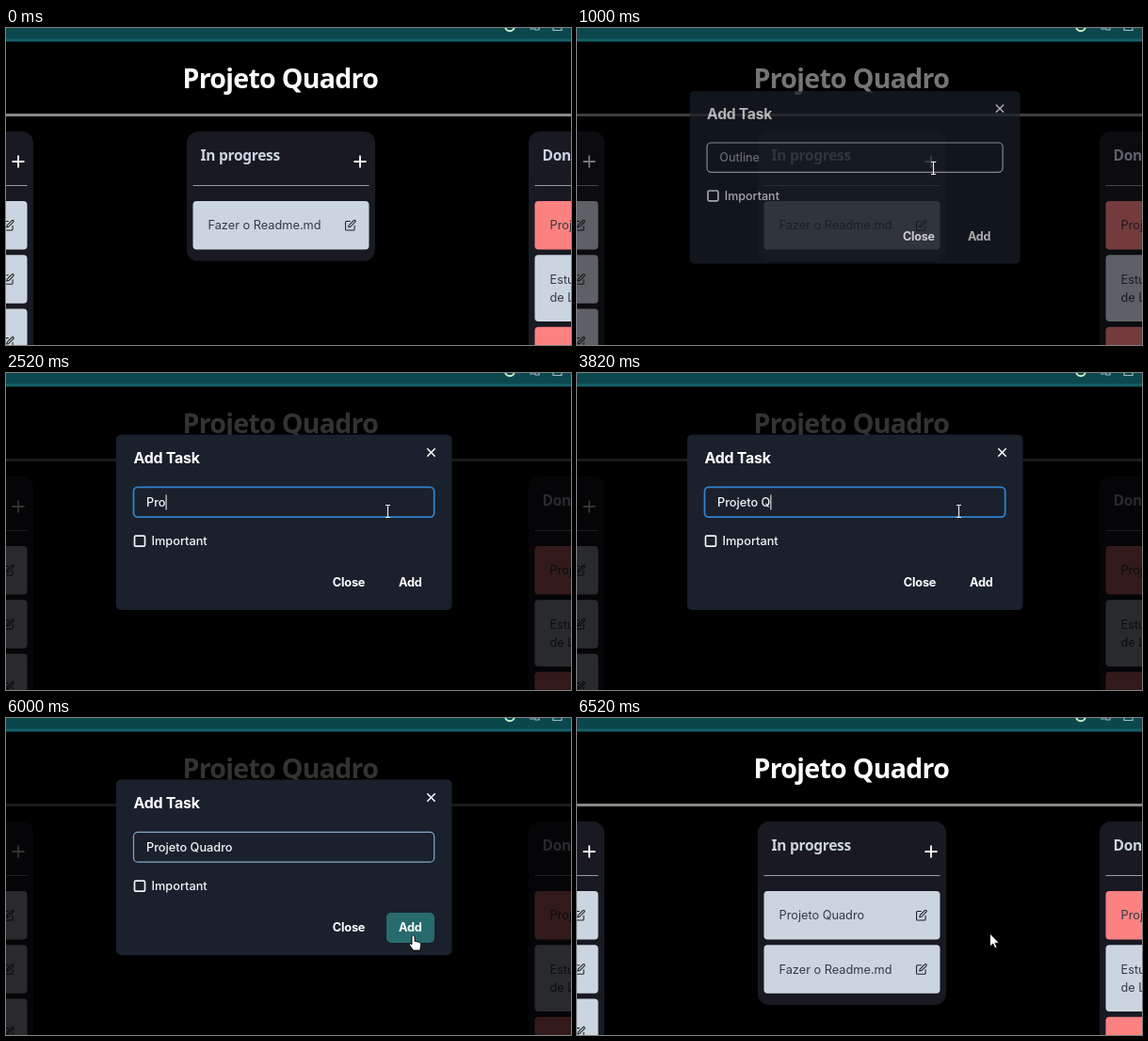
Animation, 600 px wide and 337 px high, one loop 6.56 s. Source, as an HTML page:

```html
<!DOCTYPE html>
<html lang="pt">
<head>
<meta charset="utf-8">
<title>Quadro de tarefas</title>
<style>
html, body { margin: 0; width: 100%; height: 100%; overflow: hidden; background: #000; }
svg { display: block; width: 600px; height: 337px; }
text { font: 500 12.75px Inter, "Open Sans", sans-serif; white-space: pre; }
.head { font: 700 15.5px "Noto Sans", "Open Sans", sans-serif; letter-spacing: -.018em; fill: #cbd5e0; }
.title { font-size: 28.5px; letter-spacing: -.025em; fill: #fff; }
.task { font-weight: 400; fill: #343a44; }
.strong { font-weight: 700; letter-spacing: -.015em; fill: #fff; }
.edit { fill: none; stroke: #1c2028; stroke-width: 2; stroke-linecap: round; stroke-linejoin: round; }
.cursor path { fill: #fff; stroke: #000; stroke-width: .9; stroke-linejoin: round; }
</style>
</head>
<body>
<svg viewBox="0 0 600 337">
  <rect width="600" height="337"/>
  <text class="head title" x="187.500" y="63.700">Projeto Quadro</text>
  <rect y="91" width="600" height="3" fill="#8a8884"/>
  <g id="side"></g>
  <g id="before"></g>
  <g id="after"></g>
  <rect id="shade" width="600" height="337"/>
  <g id="bar">
    <rect width="600" height="12" fill="#0c474e"/>
    <rect y="11.500" width="600" height="3" fill="#14606a"/>
    <circle cx="535" cy="-1.500" r="4.800" fill="#0c474e" stroke="#c9ecc6" stroke-width="2"/>
    <path d="M556 1h5m1-2v3h4v-3M581 -2v4.500h9v-4.500" fill="none" stroke="#a3b9bb" stroke-width="1.200"/>
  </g>
  <g id="dialog">
    <rect x="117" y="65.500" width="356.500" height="186.500" rx="5" fill="#1a202c"/>
    <text class="strong" x="135.500" y="95.500" style="font-size:15.9px">Add Task</text>
    <path d="M447.300 80.300l8.400 8.400m0-8.400l-8.400 8.400" stroke="#fff" stroke-width="1.500"/>
    <rect id="field" x="135.500" y="121.400" width="319.200" height="31.800" rx="4.500" fill="none"/>
    <text id="value" x="149" y="142"></text>
    <path id="caret" d="M0 129.500v16" stroke="#fff"/>
    <rect x="136.500" y="173.200" width="11" height="11" rx="1.200" fill="none" stroke="#f2f3f5" stroke-width="1.700"/>
    <text x="154.500" y="183.200" fill="#f2f3f5">Important</text>
    <rect id="hover" x="404" y="207" width="51" height="32" rx="5" fill="#286b6e"/>
    <g text-anchor="middle">
      <text class="strong" x="364" y="227">Close</text>
      <text class="strong" x="429.300" y="227">Add</text>
    </g>
  </g>
  <g id="arrow" class="cursor"><path d="M0 0v14l3.200-2.900 2.100 4.600 2.300-1-2.100-4.500h4.400z"/></g>
  <g id="hand" class="cursor"><path d="M-1.500 1.200q1.500-2.400 3 0v5l5 1.200q2 .5 1.700 2.500l-1 6.100h-7.200l-4.400-6.200q.6-2 2.900 0z"/></g>
  <g id="beam"><path d="M-2.500-6.500h2l.5.500.5-.500h2M0-6v12M-2.500 6.500h2l.5-.500.5.500h2" fill="none" stroke="#eee" stroke-width="1.200"/></g>
</svg>
<script>
const LOOP = 6560, OPEN = 938, FOCUS = 1150, BLUR = 5850, CLOSE = 6100, ADDED = 6150;
const PALE = '#cbd5e0', RED = '#fc8181', NAME = 'Projeto Quadro';
const KEYS = [2060, 2300, 2520, 2790, 2940, 3120, 3240, 3580, 3820, 3980, 4150, 4330, 4640, 4880];
// time, x, y of the pointer
const PATH = [
  [30, 318, 337], [620, 376, 142], [900, 376, 142], [1000, 378.5, 149], [1480, 364.5, 141],
  [2280, 405.5, 147], [5270, 405.5, 147], [5580, 418, 201], [5820, 432.5, 231],
  [6200, 432.5, 231], [6520, 438.5, 229]
];
const $ = id => document.getElementById(id);
const clamp = v => Math.max(0, Math.min(1, v));
const set = (id, attrs) => { for (const k in attrs) $(id).setAttribute(k, attrs[k]); };
const show = (id, on) => set(id, { visibility: on ? 'visible' : 'hidden' });

function card(x, y, lines, color) {
  const h = 32.2 + 19.2 * lines.length, mid = y + h / 2;
  const text = lines.map((s, i) =>
    `<text class="task" x="${x + 16}" y="${mid + 4.6 + 19.2 * (i - (lines.length - 1) / 2)}">${s}</text>`).join('');
  return `<rect x="${x}" y="${y}" width="187" height="${h}" rx="4" fill="${color}"/>${text}
    <g class="edit" transform="translate(${x + 161} ${mid - 6.4}) scale(.53)">
    <path d="M11 4H4a2 2 0 0 0-2 2v14a2 2 0 0 0 2 2h14a2 2 0 0 0 2-2v-7"/>
    <path d="M18.5 2.500a2.100 2.100 0 0 1 3 3L12 15l-4 1 1-4z"/></g>`;
}

function column(x, name, cards) {
  let y = 184, body = '';
  for (const [lines, color = PALE] of cards) {
    body += card(x + 6.5, y, lines, color);
    y += 38.1 + 19.2 * lines.length;
  }
  return `<rect x="${x}" y="110" width="200" height="${y - 103.5}" rx="12" fill="#181922"/>
    <text class="head" x="${x + 14.5}" y="140.600">${name}</text>
    <path d="M${x + 177.500} 142h13m-6.500-6.500v13" stroke="#fff" stroke-width="1.800"/>
    <path d="M${x + 6.500} 167.500h187" stroke="#989ca6"/>${body}`;
}

const readme = [['Fazer o Readme.md']];
$('side').innerHTML =
  column(-171, 'To do', [[['Rever']], [['Testar']], [['Ler', 'mais']]]) +
  column(555, 'Done', [[['Projeto'], RED], [['Estudar', 'de Layout']], [['Projeto'], RED]]);
$('before').innerHTML = column(192, 'In progress', [readme]);
$('after').innerHTML = column(192, 'In progress', [[[NAME]], readme]);

function pointer(t) {
  let i = 0;
  while (i < PATH.length - 2 && t > PATH[i + 1][0]) i++;
  const [a, b] = [PATH[i], PATH[i + 1]];
  const u = clamp((t - a[0]) / (b[0] - a[0])), e = u * u * (3 - 2 * u);
  return [a[1] + (b[1] - a[1]) * e, a[2] + (b[2] - a[2]) * e];
}

function drawField(t) {
  const count = KEYS.filter(k => t >= k).length;
  const value = $('value');
  value.textContent = count ? NAME.slice(0, count) : 'Outline';
  set('value', { fill: count ? '#f2f3f5' : '#979ba4' });
  const x = 149.5 + (count ? value.getComputedTextLength() : 0);
  const lastKey = count ? KEYS[count - 1] : FOCUS;
  set('caret', { transform: `translate(${x} 0)` });
  $('caret').style.opacity = t >= FOCUS && t < BLUR && (t - lastKey) % 1000 < 500 ? 1 : 0;
  const strong = t > 1600 && t < BLUR;
  set('field', {
    stroke: t < FOCUS ? '#c3c7ce' : strong ? '#3182ce' : t < BLUR ? '#5a98cf' : '#82aacb',
    'stroke-width': strong ? 1.8 : 1.2
  });
}

function drawPointer(t) {
  const [x, y] = pointer(t);
  const kind = t < 30 ? '' : t < 580 ? 'arrow' : t < 960 ? 'hand' : t < 5370 ? 'beam'
    : t < 5640 ? 'arrow' : t < 6180 ? 'hand' : 'arrow';
  for (const id of ['arrow', 'hand', 'beam']) {
    show(id, id === kind);
    set(id, { transform: `translate(${x} ${y})` });
  }
}

function draw(t) {
  const enter = 1 - (1 - clamp((t - OPEN) / 200)) ** 3;
  const leave = clamp((t - CLOSE) / 120) ** 2;
  const p = enter * (1 - leave), s = .95 + .05 * p;
  set('shade', { opacity: .8 * p });
  set('dialog', { opacity: p, transform: `translate(295.2 158.8) scale(${s}) translate(-295.2 -158.8)` });
  set('hover', { opacity: clamp((t - 5640) / 200) });
  show('before', t < ADDED);
  show('after', t >= ADDED);
  drawField(t);
  drawPointer(t);
}

const start = performance.now();
function tick() {
  draw((performance.now() - start) % LOOP);
  requestAnimationFrame(tick);
}
tick();
</script>
</body>
</html>
```
